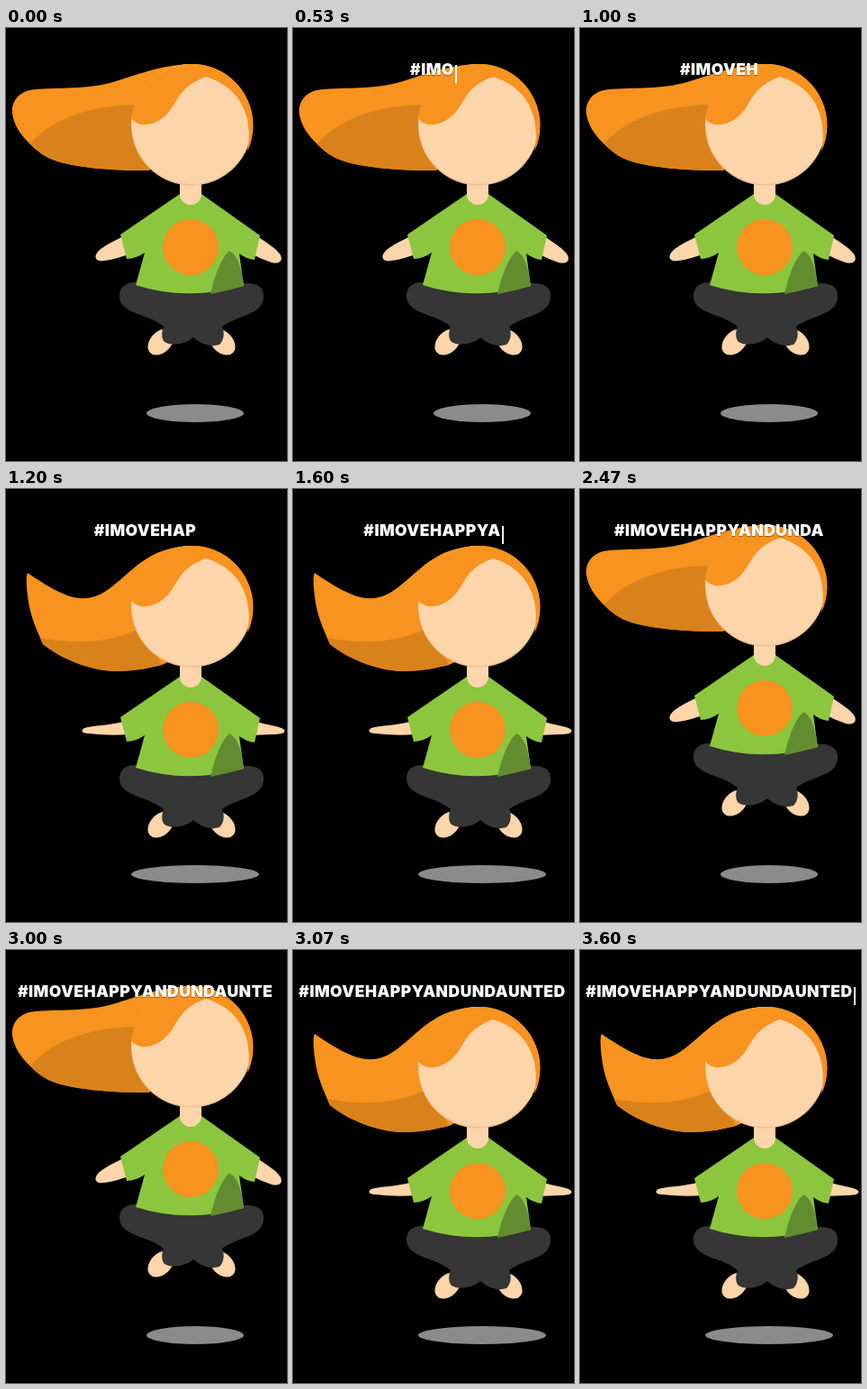
Write an HTML page that moves like this. It is 312 px wide and 480 px high and loops after 3.99 s.

```html
<!DOCTYPE html>
<html lang="en">
<head>
<meta charset="utf-8">
<title>Floating girl</title>
<style>
html, body { margin: 0; width: 312px; height: 480px; overflow: hidden; background: #000; }
svg { position: absolute; left: 0; top: 0; display: block; }
#line { position: absolute; left: 0; top: 35px; width: 312px; text-align: center; white-space: nowrap; line-height: 0; }
#tag {
  display: inline-block; height: 26px; padding-right: 3px;
  font: 900 17.5px/22px Inter, sans-serif; letter-spacing: .45px; color: #fff;
  text-shadow: 0 1px 1px rgba(0, 0, 0, .4);
  background: linear-gradient(#fff, #fff) no-repeat right 6px / 0 20px;
}
#tag.caret { background-size: 2px 20px; }
.hair { fill: #f7931e; }
.shade { fill: #d9821b; }
.skin { fill: #fdd5aa; }
.legs { fill: #363636; }
</style>
</head>
<body>
<svg width="312" height="480" viewBox="0 0 312 480">
  <ellipse id="shadow" cx="210" cy="427" rx="54" ry="10" fill="#8b8b8b"/>
  <g id="body">
    <path id="arms" class="skin"/>
    <g class="skin">
      <ellipse cx="172" cy="348" rx="11.5" ry="17" transform="rotate(45 172 348)"/>
      <ellipse cx="240" cy="348" rx="11.5" ry="17" transform="rotate(-45 240 348)"/>
    </g>
    <path class="legs" d="M143 282C131 282 126 289 126 297C126 307 134 312 146 317C158 321 166 324 175 331
      C172 338 173 345 176 348C182 352 198 352 208 343C217 351 228 354 237 351C242 346 243 338 240 331
      C249 324 262 321 272 316C281 312 286 306 286 297C286 288 280 283 268 283Z"/>
    <path fill="#8cc63f" d="M193 184L127 229L134 256Q144 256 154 249L144 285Q200 303 264 286L259 250
      Q267 256 276 257L282 230L217 184Z"/>
    <path fill="#638c30" d="M227 295C232 272 240 254 248 247C258 252 261 266 264 286Q247 291 227 295Z"/>
    <circle cx="205" cy="243" r="31" fill="#f7931e"/>
    <path class="skin" d="M193 165V184A12 12 0 0 0 217 184V165Z"/>
  </g>
  <path id="hair" class="hair"/>
  <path id="shade" class="shade"/>
  <g id="head">
    <circle cx="206" cy="107.500" r="67" fill="#ecc08f"/>
    <circle cx="206" cy="106.500" r="66.500" class="skin"/>
    <path class="hair" d="M139 100A68 68 0 1 1 268 137C275 101 262 66 222 54C186 67 192 88 172 101
      C160 109 146 110 139 100Z"/>
  </g>
</svg>
<div id="line"><span id="tag"></span></div>
<script>
const LOOP = 3990, STEP = 200 / 3;
const TEXT = "#IMOVEHAPPYANDUNDAUNTED";
const el = id => document.getElementById(id);

const high = {
  head: 0, body: 0, rx: 54,
  hair: "M210 40C170 40 145 53 115 61C85 69 50 65 26 69C11 73 6 84 7 95C9 108 16 118 26 128C40 142 50 148 80 153C105 157 130 158 159 158L206 110Z",
  shade: "M27 128C55 97 100 86 142 85L159 158C130 158 105 157 80 153C50 148 40 142 27 128Z",
  arms: "M130 231C119 237 104 243 100 251C98 256 102 259 108 258C120 257 130 253 138 250Z" +
        "M279 231C290 238 302 246 305 252C308 259 302 262 295 260C287 257 279 254 272 250Z"
};
const low = {
  head: 23, body: 24, rx: 71,
  hair: "M210 63C155 63 141 93 111 113C85 130 62 119 24 93C21 98 24 122 27 135C30 148 36 160 41 172C60 187 90 201 122 202C145 202 160 198 173 195L206 180Z",
  shade: "M38 165C75 172 115 172 152 153L173 195C160 198 145 202 122 202C90 201 60 187 41 172Z",
  arms: "M130 234C116 238 96 238 87 241C82 244 85 247 92 247C109 249 123 249 136 248Z" +
        "M279 234C290 238 306 239 309 243C311 247 304 248 296 248L273 249Z"
};

function setPose(p) {
  for (const id of ["hair", "shade", "arms"]) el(id).setAttribute("d", p[id]);
  for (const id of ["head", "body"]) el(id).setAttribute("transform", `translate(0 ${p[id]})`);
  el("shadow").setAttribute("rx", p.rx);
}

function draw(ms) {
  const t = ms % LOOP;
  const step = Math.floor((t + 5) / STEP);
  setPose(step % 30 < 16 ? high : low);
  el("tag").textContent = TEXT.slice(0, Math.floor(step / 2));
  el("tag").className = (t + 5) % 1000 >= 500 ? "caret" : "";
}

const start = performance.now();
function tick(now) {
  draw(Math.max(0, now - start));
  requestAnimationFrame(tick);
}
draw(0);
requestAnimationFrame(tick);
</script>
</body>
</html>
```
